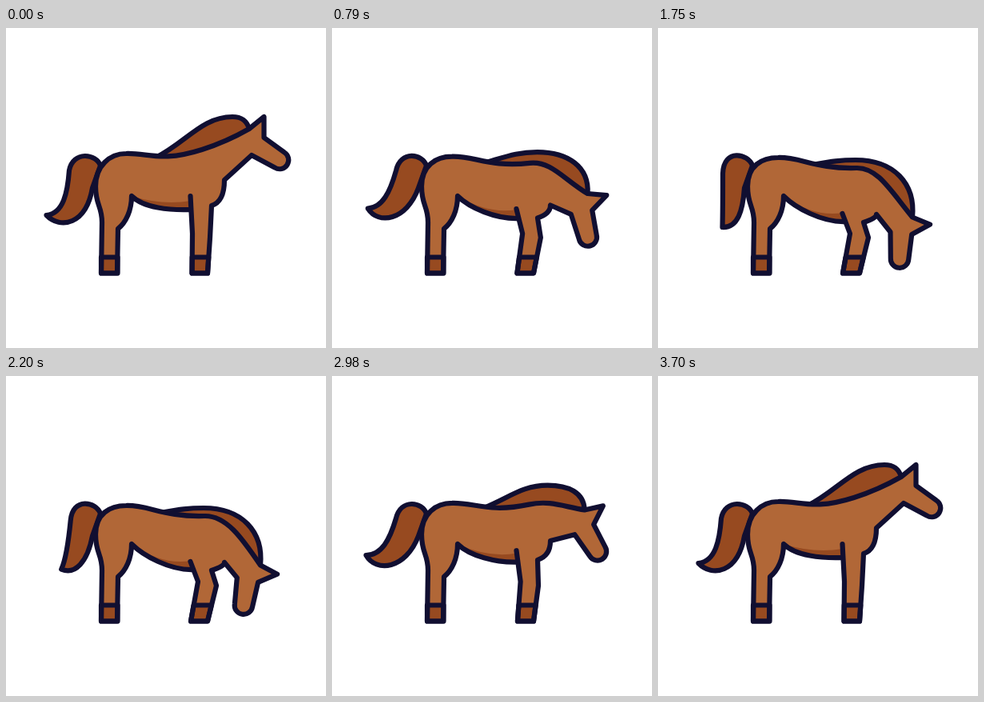
Recreate the animation shown at these times as an HTML page. Size 400 by 400 pixels, loop 3.73 s.

```html
<!DOCTYPE html>
<html lang="en">
<head>
<meta charset="utf-8">
<title>Grazing horse</title>
<style>
  html, body { margin: 0; height: 100%; overflow: hidden; background: #fff; }
  svg { display: block; width: 100vw; height: 100vh; }
  path { stroke: #110f31; stroke-width: 6.2; stroke-linecap: round; stroke-linejoin: round; }
  .coat { fill: #b16737; }
  .dark { fill: #974a20; }
  .flat { stroke: none; }
  .line { fill: none; }
</style>
</head>
<body>
<svg viewBox="0 0 400 400">
  <path id="tail" class="dark"/>
  <path id="mane" class="dark"/>
  <path id="coat" class="coat flat"/>
  <path id="shade" class="dark flat"/>
  <path id="hooves" class="dark"/>
  <path id="outline" class="line"/>
</svg>
<script>
const LOOP = 3730;

const mix = (a, b, k) => a + (b - a) * k;
const ramp = (from, to, t) => Math.min(1, Math.max(0, (t - from) / (to - from)));
const smooth = (from, to, t) => {
  const k = ramp(from, to, t);
  return k * k * (3 - 2 * k);
};
const setPath = (id, d) => document.getElementById(id).setAttribute('d', d);

function bezierEase(x1, y1, x2, y2) {
  const at = (s, a, b) => 3 * s * (1 - s) ** 2 * a + 3 * s * s * (1 - s) * b + s ** 3;
  return x => {
    let lo = 0, hi = 1;
    for (let i = 0; i < 24; i++) {
      const s = (lo + hi) / 2;
      if (at(s, x1, x2) < x) lo = s; else hi = s;
    }
    return at(hi, y1, y2);
  };
}
const lower = bezierEase(.1, .1, .5, 1);
const raise = bezierEase(.4, 0, .2, 1);

// k: 0 = head up, 1 = grazing; nod: extra head turn in degrees
function drawBody(k, nod) {
  const rump = 157 + 5 * k;
  const withers = { x: 245 + 3 * k, y: 152 + 23 * k, slope: .32 - .29 * k };
  const poll = { x: 304 + 41 * k - 27 * k * k, y: 126 + 110.5 * k };
  const chestY = 190 + 43 * k, legY = 222 + 21 * k, elbowY = 210 + 22 * k;
  const kneeL = 233 + 7 * k, kneeR = 255 + 8 * k, hoofL = 232.5 - 1.5 * k;
  const bellyY = 227 + 15 * k;
  const bellyX = mix(230.5, kneeL, (bellyY - elbowY) / (257 - elbowY));
  const belly = `C205,${bellyY + 1} 172,225 157,210`;

  const turn = (60 * k + nod) * Math.PI / 180, cos = Math.cos(turn), sin = Math.sin(turn);
  const head = (x, y) => `${poll.x + x * cos - y * sin},${poll.y + x * sin + y * cos}`;
  const alongBack = dx => `${withers.x + dx},${withers.y - dx * withers.slope}`;

  const body = `M119,306.500 L120,243 C120,222 112,222 112,198 C112,172 130,${rump} 150,${rump}
    C178,${rump - 1} ${alongBack(-51)} ${alongBack(0)}
    C${alongBack(27)} ${head(-14 - 27 * k, 8)} ${head(0, 0)}
    L${head(18.5, -15)} L${head(18.5, 11)} L${head(44, 29.5)} A11,11 0 0 1 ${head(32, 48.5)}
    L${head(3, 33)} L273,${chestY} Q273,${legY - 5} 257,${legY}
    L${kneeR},262 L252,306.500 L${hoofL},306.500 L${kneeL},257 L230.5,${elbowY}
    L${bellyX},${bellyY} ${belly} C157,228 150,243 140,251 L139,306.500 Z`;
  setPath('coat', body);
  setPath('outline', body);

  setPath('shade', `M157,210 Q195,${bellyY - 5} 231,${bellyY - 11} L${bellyX},${bellyY} ${belly} Z`);
  setPath('hooves', `M119,286.500 H139.500 V306.500 H119 Z
    M${mix(kneeL, hoofL, .6)},286.500 H${mix(kneeR, 252, .57)} L252,306.500 H${hoofL} Z`);

  const crest = { x: 283 - 36 * k, y: 111 + 77 * k - 23 * k * k };
  const root = { x: 187 + 5 * k, y: 162 + 9 * k };
  setPath('mane', `M${root.x},${root.y}
    C${root.x + 38 - 14 * k},${root.y - 19 + 15 * k} ${crest.x - 38 + 18 * k},${crest.y}
    ${crest.x},${crest.y}
    C${crest.x + 12 + 36 * k},${crest.y} ${poll.x - 3 + 7 * k},${poll.y - 10 - 32 * k}
    ${poll.x},${poll.y} L${withers.x + 20},${withers.y + 18} Z`);
}

// swing: 0 = hanging, 1 = flicked out; droop lets the tip sag and curl
function drawTail(swing, droop) {
  const move = (x, y, swingX, swingY, droopX, droopY) =>
    `${x + swingX * swing + droopX * droop},${y + swingY * swing + droopY * droop}`;
  setPath('tail', `M118,172 C113,157 ${move(82, 150, 4, 3, -2, 0)} ${move(81, 182, -1, -4, -1, 0)}
    C${move(81, 205, -9, 0, 5, 0)} ${move(81, 230, -19, -6, 10, 8)} ${move(80.5, 249, -38, -25, 8, 10)}
    C${move(100, 250, -45, -4, 13, 6)} ${move(106, 228, -14, 14, 8, 4)} 108,200 Z`);
}

function draw(t) {
  const k = t < 2490 ? lower(ramp(100, 1450, t)) : 1 - raise(ramp(2490, 3700, t));
  const nod = 10 * (smooth(1500, 2600, t) - smooth(2600, 3300, t));
  drawBody(k, nod);

  const swing = 1 - smooth(620, 1750, t) + smooth(1750, 3000, t);
  const droop = 1 - smooth(60, 560, t) + smooth(3030, 3700, t);
  drawTail(swing, droop);
}

function tick() {
  draw(performance.now() % LOOP);
  requestAnimationFrame(tick);
}
tick();
</script>
</body>
</html>
```
